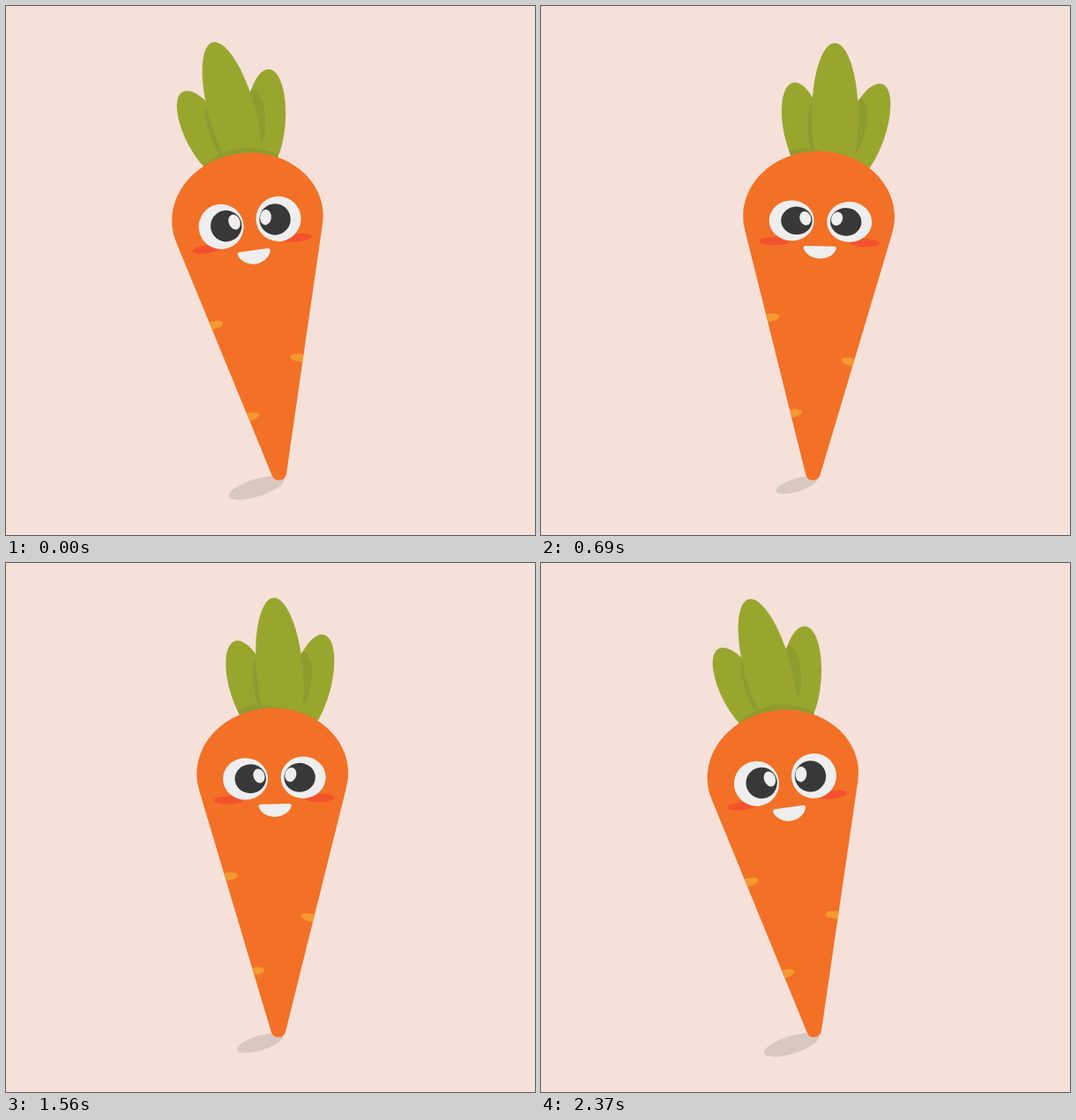
Write an HTML page with a canvas that moves like this. It is 600 by 600 pixels and loops after 2.4 s.

```html
<!DOCTYPE html>
<html lang="en">
<head>
<meta charset="utf-8">
<title>Swaying carrot</title>
<style>
  html, body { margin: 0; width: 100%; height: 100%; overflow: hidden; background: #f5e1da; }
  canvas { display: block; width: 600px; height: 600px; }
</style>
</head>
<body>
<canvas id="stage" width="600" height="600"></canvas>
<script>
const ctx = document.getElementById('stage').getContext('2d');
const LOOP = 2400, SWING = 600, STEP = 30;
const COLOR = {
  ground: '#f5e1da', shadow: '#d9c8c1', body: '#f37126', spot: '#f49a30',
  blush: '#f4522c', leaf: '#99a62e', leafDark: '#8d9b2f', white: '#eeeeee', pupil: '#383838'
};
const rad = deg => deg * Math.PI / 180;

function ellipse(x, y, rx, ry, tilt = 0) {
  const path = new Path2D();
  path.ellipse(x, y, rx, ry, rad(tilt), 0, 2 * Math.PI);
  return path;
}

function fill(path, color) {
  ctx.fillStyle = color;
  ctx.fill(path);
}

function group(draw) {
  ctx.save();
  draw();
  ctx.restore();
}

function fillInside(mask, path, color) {
  group(() => { ctx.clip(mask); fill(path, color); });
}

// Symmetric cubic-bezier(0.27, 0, 0.73, 1)
function ease(x) {
  let lo = 0, hi = 1;
  for (let i = 0; i < 24; i++) {
    const s = (lo + hi) / 2, r = 1 - s;
    if (3 * 0.27 * s * r * r + 3 * 0.73 * s * s * r + s * s * s < x) lo = s; else hi = s;
  }
  return lo * lo * (3 - 2 * lo);
}

// The origin of the body is the centre of the head.
const body = new Path2D(
  'M-86 0 A86 74.5 0 0 1 86 0 Q86 8 83.5 17 L8.2 292.6 ' +
  'A8.5 8.5 0 0 1 -8.2 292.6 L-83.5 17 Q-86 8 -86 0 Z');
const mouth = new Path2D(
  'M-16 31.5 L16.3 31.5 Q19.2 31.8 18.5 35 C16 42.5 8 47.2 0 47.2 ' +
  'C-8 47.2 -16 42.5 -18.5 35 Q-19.2 31.8 -16 31.5 Z');

// The origin of the leaves is the centre of the middle one.
const leftLeaf = ellipse(-34.8, 17.5, 23, 57, -13);
const rightLeaf = ellipse(33.2, 20, 23, 60, 20);
const middleLeaf = ellipse(0, 0, 26.5, 83);

function drawLeaves(p) {
  const place = new DOMMatrix()
    .translate(-2.6 + 24 * p - 4.5 * p * p, -121.2 + 7.3 * p)
    .rotate(-8.55 + 7.65 * p);
  const crown = new Path2D();
  for (const leaf of [leftLeaf, rightLeaf, middleLeaf]) crown.addPath(leaf, place);

  group(() => {
    ctx.transform(place.a, place.b, place.c, place.d, place.e, place.f);
    fill(leftLeaf, COLOR.leaf);
    fill(rightLeaf, COLOR.leaf);
    fillInside(leftLeaf, ellipse(-18.5, 12, 12.5, 37), COLOR.leafDark);
    fillInside(rightLeaf, ellipse(19.8, 15, 14.5, 36, 15), COLOR.leafDark);
    fill(middleLeaf, COLOR.leaf);
  });
  fillInside(crown, ellipse(1.5 - 21 * p, -34.9 + 3 * p, 60, 45), COLOR.leafDark);
}

function drawEye(x, pupilX, shineX, shineY, tilt) {
  fill(ellipse(x, 0, 25.5, 25.5), COLOR.white);
  fill(ellipse(x + pupilX, 0, 17.7, 17.7), COLOR.pupil);
  fill(ellipse(x + shineX, shineY, 6.4, 8.8, tilt), COLOR.white);
}

function drawFace(p) {
  fill(ellipse(-50, 28.7, 17, 4.7, 0), COLOR.blush);
  fill(ellipse(53, 28.5, 17, 4.7, 0), COLOR.blush);
  group(() => {
    ctx.translate(2, 5);
    ctx.rotate(rad(-0.8 + p));
    ctx.scale(1, 1 - 0.11 * p);
    drawEye(-32.8, 5.7, 15.5, -3.2, -14);
    drawEye(32.8, -4, -14.2, -3.7, 14);
    fill(mouth, COLOR.white);
  });
}

function draw(time) {
  const phase = time % (2 * SWING) / SWING;
  const p = ease(phase < 1 ? phase : 2 - phase);

  ctx.fillStyle = COLOR.ground;
  ctx.fillRect(0, 0, 600, 600);

  const size = 1 - 0.27 * p;
  fill(ellipse(284 + 6.4 * p, 546.5 - 3.4 * p, 32.5 * size, 10 * size, -17), COLOR.shadow);

  group(() => {
    ctx.translate(308.7, 522);
    ctx.rotate(rad(-7.05 + 9.03 * p));
    ctx.translate(0, -283);
    drawLeaves(p);
    fill(body, COLOR.body);
    fillInside(body, ellipse(-54, 115.5, 12, 4.6, -7), COLOR.spot);
    fillInside(body, ellipse(-26, 223.5, 12, 4.5, -7), COLOR.spot);
    fillInside(body, ellipse(40.1, 164, 11.5, 4.5, 12), COLOR.spot);
    drawFace(p);
  });
}

function tick() {
  const time = performance.now() % LOOP;
  draw(Math.floor(time / STEP) * STEP);
  requestAnimationFrame(tick);
}
tick();
</script>
</body>
</html>
```
